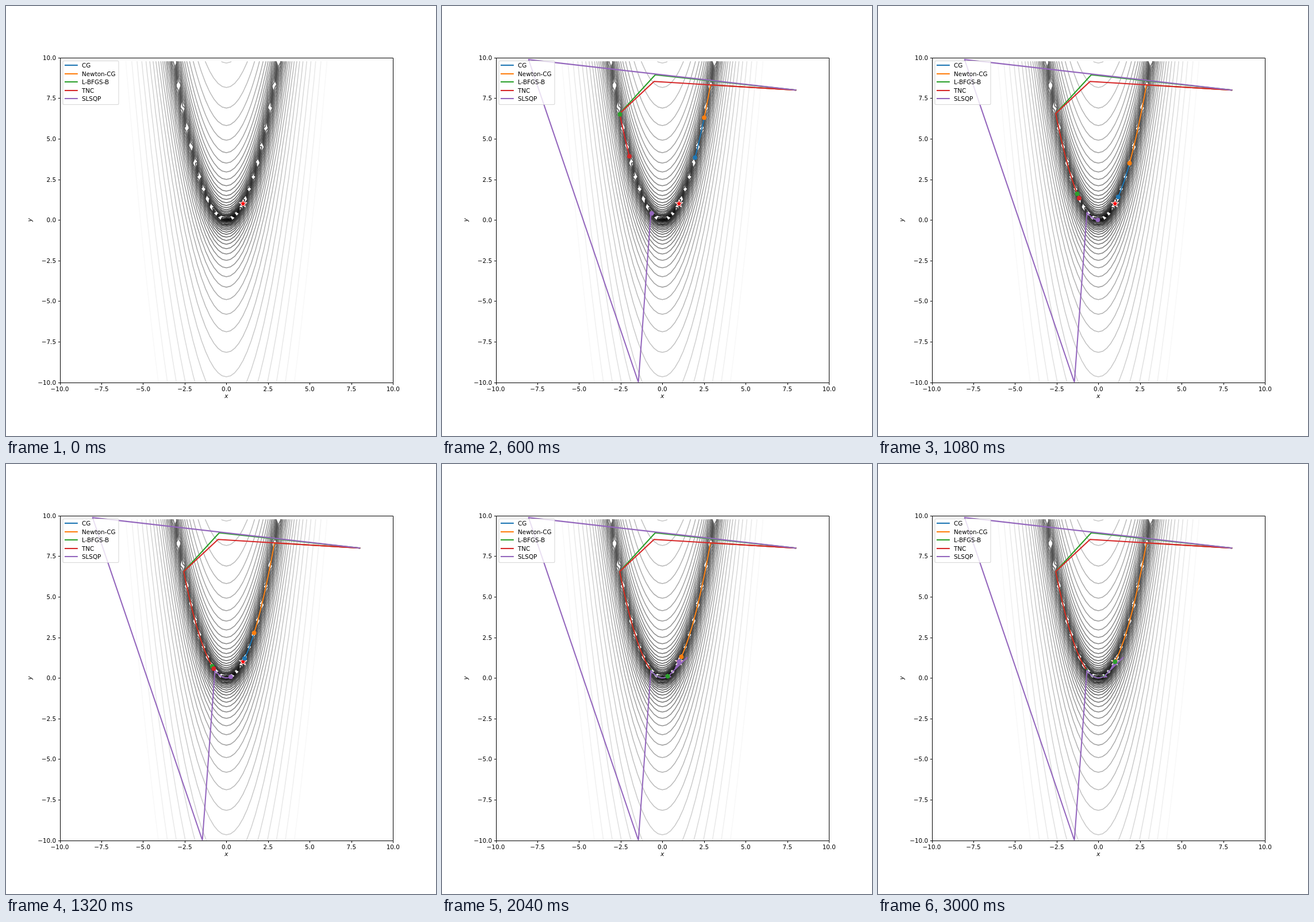
These frames come from a looping animation (748 by 748 pixels, 3360 ms). An HTML page with a canvas:

```html
<!DOCTYPE html>
<html>
<head>
<meta charset="utf-8">
<style>
html, body { margin: 0; overflow: hidden; background: #fff; }
canvas { display: block; }
</style>
</head>
<body>
<canvas id="stage" width="748" height="748"></canvas>
<script>
const SIZE = 748, STEP = 60, LOOP = 3360, PT = SIZE / 720, EM = 10 * PT;
const FONT = '"DejaVu Sans", sans-serif';
const BOX = { l: SIZE * 0.125, t: SIZE * 0.12, r: SIZE * 0.9, b: SIZE * 0.875 };
const px = x => BOX.l + (x + 10) / 20 * (BOX.r - BOX.l);
const py = y => BOX.b - (y + 10) / 20 * (BOX.b - BOX.t);
const snap = v => Math.floor(v + 0.5) + 0.5;

// Each search makes a few jumps, then creeps along the valley y = x²,
// reaching the next value in `stops` every 8th iteration.
// `kicks` are single trial steps off that track.
const valley = x => [x, x * x];
const start = [8, 8], downhill = [2.885, 8.32];
const methods = [
  { name: 'CG', color: '#1f77b4', length: 29,
    jumps: [start, downhill], stops: [1.96, 1.19, 1] },
  { name: 'Newton-CG', color: '#ff7f0e', length: 42,
    jumps: [start, downhill], stops: [2.51, 1.87, 1.46, 1.14, 1.03] },
  { name: 'L-BFGS-B', color: '#2ca02c', length: 56,
    jumps: [start, [-0.43, 8.94], valley(-2.56)], stops: [-2.55, -1.27, -0.42, 0.32, 0.85, 1] },
  { name: 'TNC', color: '#d62728', length: 22,
    jumps: [start, [-0.5, 8.53], valley(-2.56)], stops: [-1.98, -1.155, -0.36] },
  { name: 'SLSQP', color: '#9467bd', length: 42,
    jumps: [start, [-8.03, 9.88], [-1.44, -10], [-0.69, 0.4]], stops: [-0.64, -0.03, 0.55, 1],
    kicks: { 22: [0.5, 0.07], 28: [1.49, 1.26] } }
];

function trace({ jumps, stops, kicks = {}, length }) {
  const first = jumps.length - 1;
  const place = k => {
    if (k <= first) return jumps[k];
    if (kicks[k]) return kicks[k];
    const i = Math.max(0, Math.ceil((k - 9) / 8));
    if (i >= stops.length) return valley(stops[stops.length - 1]);
    const from = i ? stops[i - 1] : jumps[first][0], k0 = i ? 1 + 8 * i : first;
    return valley(from + (stops[i] - from) * (k - k0) / (9 + 8 * i - k0));
  };
  return Array.from({ length }, (_, k) => {
    const [x, y] = place(k);
    return [px(x), py(y)];
  });
}
for (const m of methods) m.path = trace(m);

function clipToAxes(c) {
  c.beginPath();
  c.rect(BOX.l, BOX.t, BOX.r - BOX.l, BOX.b - BOX.t);
  c.clip();
}

// Marching squares over a coarse grid
function drawContours(c) {
  const n = 80, h = 0.25, at = i => -10 + i * h;
  const f = (i, j) => (1 - at(i)) ** 2 + 100 * (at(j) - at(i) ** 2) ** 2;
  const corners = [[0, 0], [1, 0], [1, 1], [0, 1]];
  c.lineWidth = 1.5 * PT;
  c.lineCap = 'round';
  for (let k = 0; k < 35; k++) {
    const level = 10 ** (5 * k / 34), g = Math.round(255 * k / 34);
    const join = (p, q) => { c.moveTo(...p); c.lineTo(...q); };
    c.strokeStyle = `rgb(${g},${g},${g})`;
    c.beginPath();
    for (let i = 0; i < n - 1; i++) for (let j = 0; j < n - 1; j++) {
      const z = corners.map(([a, b]) => f(i + a, j + b)), pts = [];
      corners.forEach(([a, b], e) => {
        const next = (e + 1) % 4, [a2, b2] = corners[next];
        if (z[e] > level === z[next] > level) return;
        const u = (level - z[e]) / (z[next] - z[e]);
        pts.push([px(at(i + a + (a2 - a) * u)), py(at(j + b + (b2 - b) * u))]);
      });
      if (pts.length === 2) join(...pts);
      if (pts.length === 4) {
        const mid = (z[0] + z[1] + z[2] + z[3]) / 4;
        const s = mid > level === z[0] > level ? 0 : 1;
        join(pts[s], pts[s + 1]);
        join(pts[s + 2], pts[(s + 3) % 4]);
      }
    }
    c.stroke();
  }
}

function drawStar(c) {
  c.beginPath();
  for (let i = 0; i < 10; i++) {
    const r = 7 * PT * (i % 2 ? 0.382 : 1), a = i * Math.PI / 5;
    c.lineTo(px(1) + r * Math.sin(a), py(1) - r * Math.cos(a));
  }
  c.closePath();
  c.fillStyle = '#f00';
  c.strokeStyle = '#fff';
  c.lineWidth = PT;
  c.lineJoin = 'bevel';
  c.fill();
  c.stroke();
}

function drawAxes(c) {
  const l = snap(BOX.l), t = snap(BOX.t), r = snap(BOX.r), b = snap(BOX.b);
  c.strokeStyle = c.fillStyle = '#000';
  c.lineWidth = 1;
  c.font = `${EM}px ${FONT}`;
  c.beginPath();
  c.rect(l, t, r - l, b - t);
  for (let v = -10; v <= 10; v += 2.5) {
    const label = v.toFixed(1).replace('-', '\u2212'), x = snap(px(v)), y = snap(py(v));
    c.moveTo(x, b); c.lineTo(x, b + 3.5 * PT);
    c.moveTo(l, y); c.lineTo(l - 3.5 * PT, y);
    c.textAlign = 'center';
    c.fillText(label, px(v), 670);
    c.textAlign = 'right';
    c.fillText(label, 87, Math.round(py(v)) + 4);
  }
  c.stroke();
  c.textAlign = 'center';
  c.font = `italic ${EM}px ${FONT}`;
  c.fillText('x', px(0), 682);
  c.save();
  c.translate(45, py(0));
  c.rotate(-Math.PI / 2);
  c.fillText('y', 0, 0);
  c.restore();
}

function drawLegend(c) {
  c.beginPath();
  c.roundRect(99, 95.5, 97, 76, 2);
  c.fillStyle = 'rgba(255,255,255,.8)';
  c.strokeStyle = 'rgba(204,204,204,.8)';
  c.lineWidth = PT;
  c.fill();
  c.stroke();
  c.font = `${EM}px ${FONT}`;
  c.textAlign = 'left';
  c.fillStyle = '#000';
  c.lineWidth = 2 * PT;
  c.lineCap = 'square';
  methods.forEach((m, i) => {
    const y = Math.round(103.3 + 14.45 * i);
    c.strokeStyle = m.color;
    c.beginPath();
    c.moveTo(103, y);
    c.lineTo(123.8, y);
    c.stroke();
    c.fillText(m.name, 132, y + 4);
  });
}

function layer(...parts) {
  const cv = document.createElement('canvas');
  cv.width = cv.height = SIZE;
  const c = cv.getContext('2d');
  parts.forEach(part => part(c));
  return cv;
}
const back = layer(clipToAxes, drawContours, drawStar);
const front = layer(drawAxes, drawLegend);
const ctx = document.getElementById('stage').getContext('2d');

function draw(now) {
  const n = Math.floor(now % LOOP / STEP);
  ctx.fillStyle = '#fff';
  ctx.fillRect(0, 0, SIZE, SIZE);
  ctx.drawImage(back, 0, 0);
  ctx.save();
  clipToAxes(ctx);
  ctx.lineWidth = 2 * PT;
  ctx.lineJoin = 'round';
  ctx.lineCap = 'square';
  for (const { path, color } of methods) {
    ctx.strokeStyle = color;
    ctx.beginPath();
    path.slice(0, n).forEach(p => ctx.lineTo(...p));
    ctx.stroke();
  }
  // A marker disappears once its path has run out
  for (const { path, color } of methods) {
    const p = path[n - 1];
    if (!p) continue;
    ctx.fillStyle = color;
    ctx.beginPath();
    ctx.arc(...p, 3.75 * PT, 0, 2 * Math.PI);
    ctx.fill();
  }
  ctx.restore();
  ctx.drawImage(front, 0, 0);
}

const begin = performance.now();
function tick() {
  draw(performance.now() - begin);
  requestAnimationFrame(tick);
}
tick();
</script>
</body>
</html>
```
